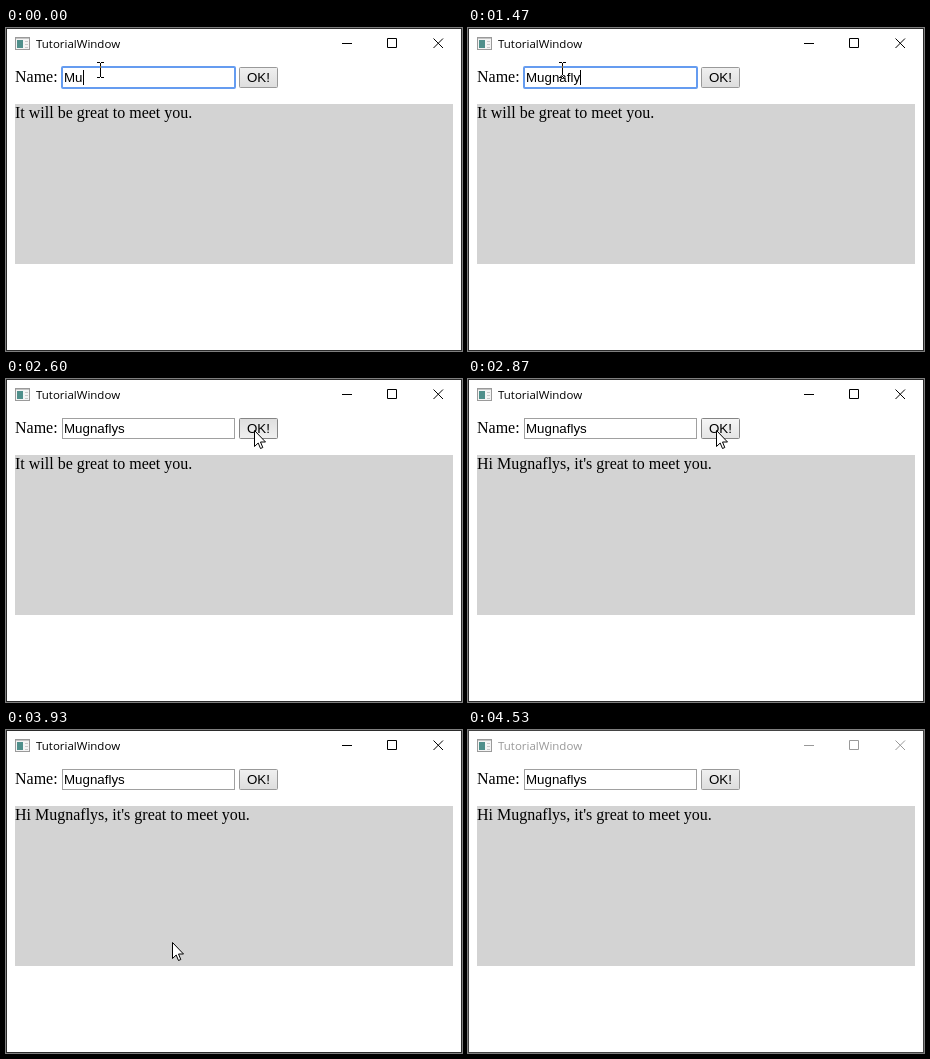
An HTML page for the animation above (4590 ms loop, 456 px wide and 323 px high).

```html
<!DOCTYPE html>
<html lang="en">
<head>
<meta charset="utf-8">
<title>TutorialWindow</title>
<style>
  html, body { margin: 0; width: 100%; height: 100%; overflow: hidden; background: #fff; }
  svg { display: block; isolation: isolate; }
  .title { font: 11.5px "Open Sans", sans-serif; }
  .page { font: 16px "Liberation Serif", serif; }
  .control { font: 13.333px "Liberation Sans", sans-serif; }
  #beam { mix-blend-mode: difference; }
</style>
</head>
<body>
<svg width="456" height="323" viewBox="0 0 456 323">
  <defs>
    <linearGradient id="normal" x2="0" y2="1">
      <stop stop-color="#f0f0f0"/><stop offset="1" stop-color="#dddddd"/>
    </linearGradient>
    <linearGradient id="hover" x2="0" y2="1">
      <stop stop-color="#f6f6f6"/><stop offset="1" stop-color="#e4e4e4"/>
    </linearGradient>
    <linearGradient id="pressed" x2="0" y2="1">
      <stop stop-color="#dedede"/><stop offset="1" stop-color="#f0f0f0"/>
    </linearGradient>
  </defs>
  <rect width="456" height="323" fill="#fff"/>

  <g id="icon">
    <rect x="9.5" y="9.5" width="14" height="12" fill="#f4f4f4" stroke="#9a9a9a"/>
    <path d="M10 10.5h13" stroke="#c4c4c4"/>
    <rect x="11" y="12" width="6" height="8" fill="#4f8f8b"/>
    <path d="M19 13.5h3M19 16.5h3M19 19.5h3" stroke="#c8c8c8"/>
  </g>
  <g id="chrome">
    <text class="title" x="30" y="20">TutorialWindow</text>
    <path d="M336 15.5h10M381.5 10.5h9v9h-9zM427.5 10.5l9.5 9.5M437 10.5l-9.5 9.5" fill="none" stroke="currentColor"/>
  </g>

  <text class="page" x="9" y="54">Name:</text>
  <rect x="56.5" y="39.5" width="172" height="20" fill="#fff" stroke="#a0a0a0"/>
  <rect id="ring" x="56" y="39" width="173" height="21" rx="1" fill="none" stroke="#659cf0" stroke-width="2"/>
  <text id="entry" class="control" x="58" y="54"></text>
  <rect id="caret" y="42" width="1" height="15"/>

  <rect id="button" x="233.5" y="39.5" width="38" height="20" rx="1"/>
  <text class="control" x="241" y="54">OK!</text>

  <rect x="9" y="76" width="438" height="160" fill="#d3d3d3"/>
  <text id="message" class="page" x="9" y="90"></text>

  <path id="beam" d="M-3-7.5h3M1-7.5h3M.5-7V7M-3 7.5h3M1 7.5h3" stroke="#fff"/>
  <path id="arrow" d="M.5.5V16.5L4.2 13 6.5 18.5 8.8 17.5 6.5 12H11.5Z" fill="#fff" stroke="#000"/>
  <rect id="border" x=".5" y=".5" width="455" height="322" fill="none"/>
</svg>
<script>
const LOOP = 4590;
const NAME = "Mugnaflys";
const KEY_TIMES = [330, 600, 930, 1070, 1270, 1470, 1930];
const PRESS = 2600, RELEASE = 2800, REPLY = 2870, LEAVE = 3730, BLUR = 4530;

// Pointer samples: [time, x, y]
const POINTER = [
  [0, 94, 42], [2000, 104, 39], [2070, 142, 36], [2130, 192, 37], [2200, 226, 44.5],
  [2270, 238, 47], [2330, 245, 48], [2400, 248, 49], [2470, 248, 51],
  [LEAVE, 249, 65], [3800, 238, 92], [3870, 207, 148], [3930, 166, 212],
  [4000, 124, 264], [4070, 78, 308], [4200, 78, 340]
];

const el = id => document.getElementById(id);
const show = (id, visible) => el(id).setAttribute("visibility", visible ? "visible" : "hidden");
const setText = (id, text) => { if (el(id).textContent !== text) el(id).textContent = text; };

function drawField(t) {
  const typed = 2 + KEY_TIMES.filter(k => k <= t).length;
  setText("entry", NAME.slice(0, typed));
  el("caret").setAttribute("x", Math.round(58 + el("entry").getComputedTextLength()));
  show("ring", t < PRESS);
  show("caret", t < PRESS);
}

function drawButton(t, pointerX) {
  const pressed = t >= PRESS && t < RELEASE;
  const hover = pointerX >= 233 && t < LEAVE;
  const state = pressed ? "pressed" : hover ? "hover" : "normal";
  el("button").setAttribute("fill", `url(#${state})`);
  el("button").setAttribute("stroke", state === "normal" ? "#999" : "#858585");
}

function draw(t) {
  const [, x, y] = POINTER.findLast(p => p[0] <= t);
  const overField = t < 2270;
  drawField(t);
  drawButton(t, x);
  setText("message", t < REPLY ? "It will be great to meet you." : `Hi ${NAME}, it's great to meet you.`);

  show("beam", overField);
  show("arrow", !overField && t < 4200);
  el(overField ? "beam" : "arrow").setAttribute("transform", `translate(${x} ${y})`);

  const active = t < BLUR;
  el("chrome").setAttribute("color", active ? "#000" : "#999");
  el("chrome").setAttribute("fill", active ? "#000" : "#999");
  el("border").setAttribute("stroke", active ? "#2b2b2b" : "#434343");
}

const start = performance.now();
function tick() {
  draw((performance.now() - start) % LOOP);
  requestAnimationFrame(tick);
}
tick();
</script>
</body>
</html>
```
